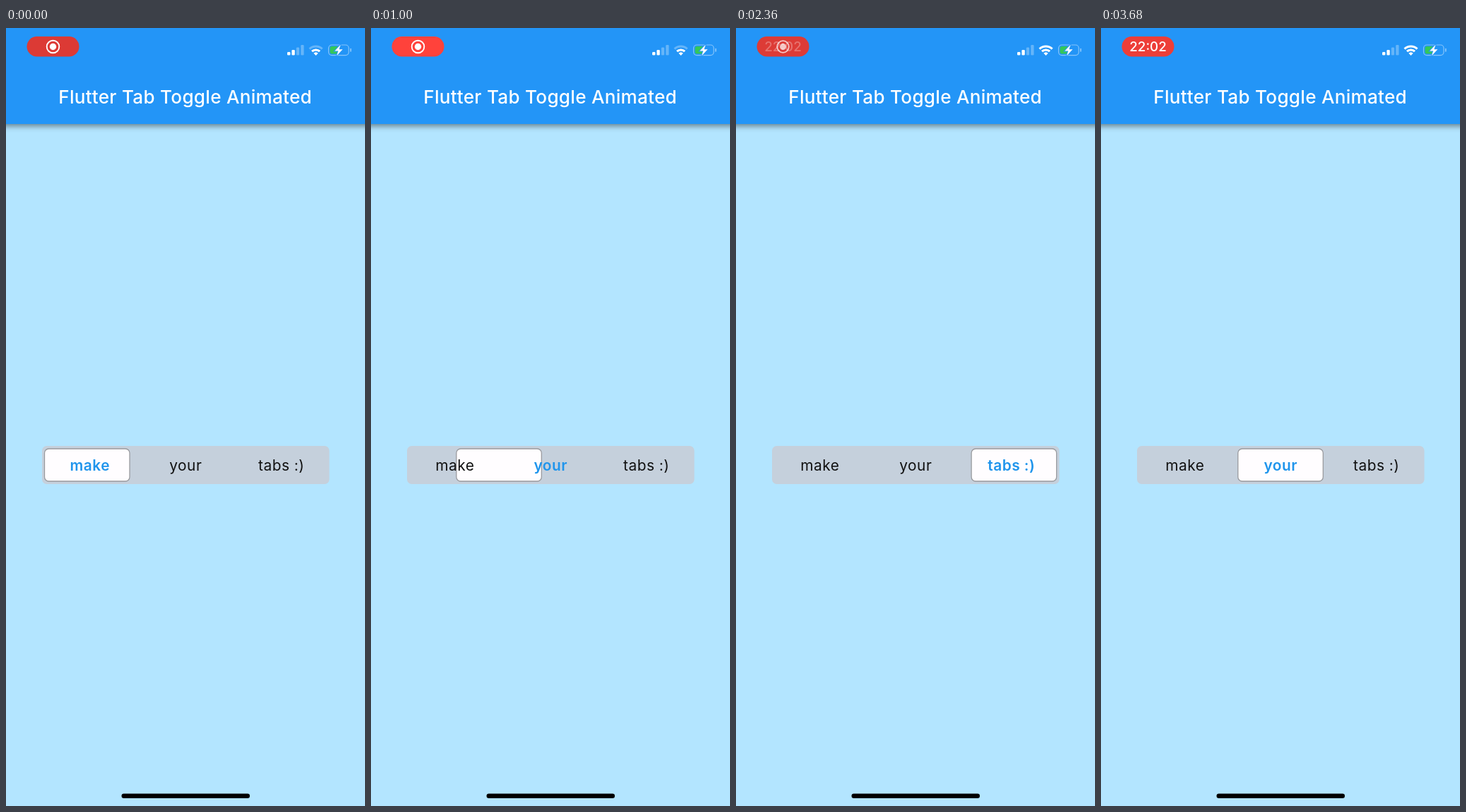
An HTML page with a canvas for the animation above (3.72 s loop, 508x1102 px).

```html
<!DOCTYPE html>
<html lang="en">
<head>
<meta charset="utf-8">
<title>Tab toggle</title>
<style>
  html, body { margin: 0; width: 100%; height: 100%; overflow: hidden; background: #b3e5ff; }
  canvas { display: block; width: 508px; height: 1102px; }
</style>
</head>
<body>
<canvas id="stage"></canvas>
<script>
const W = 508, H = 1102, LOOP = 3720;
const canvas = document.getElementById('stage');
const ctx = canvas.getContext('2d');
const dpr = window.devicePixelRatio || 1;
canvas.width = W * dpr;
canvas.height = H * dpr;

const BLUE = '#2395f7', FAINT = 'rgba(255,255,255,.3)';
const TABS = ['make', 'your', 'tabs :)'];
const MOVES = [
  { at: 880, from: 0, to: 1 },
  { at: 1560, from: 1, to: 2 },
  { at: 2600, from: 2, to: 1 }
];
const MOVE_MS = 250;

const clamp = v => Math.min(1, Math.max(0, v));
const ramp = (t, start, length) => clamp((t - start) / length);
const ease = p => p * p * (3 - 2 * p);

function box(x, y, w, h, r, fill) {
  ctx.beginPath();
  ctx.roundRect(x, y, w, h, r);
  if (fill) {
    ctx.fillStyle = fill;
    ctx.fill();
  }
}

function text(str, x, y, size, weight, color, spacing = 0) {
  ctx.font = `${weight} ${size}px Inter, "Open Sans", sans-serif`;
  ctx.letterSpacing = spacing + 'px';
  ctx.textAlign = 'center';
  ctx.fillStyle = color;
  ctx.fillText(str, x + spacing / 2, y);
}

function appBar() {
  ctx.save();
  ctx.shadowColor = 'rgba(0,0,0,.45)';
  ctx.shadowBlur = 8 * dpr;
  ctx.shadowOffsetY = 3 * dpr;
  ctx.fillStyle = BLUE;
  ctx.fillRect(-20, -20, W + 40, 156);
  ctx.restore();
  text('Flutter Tab Toggle Animated', 253.5, 107, 26.05, 500, '#fff', 0.3);
}

function recordPill(t) {
  const pulse = Math.cos((t - 1160) / 1000 * Math.PI);
  const rgb = [238 + 21 * pulse, 62 + 4 * pulse, 56 + 3 * pulse].map(Math.round);
  box(29.5, 12, 74, 28.5, 14.25, `rgb(${rgb})`);

  const swap = ramp(t, 2270, 320);
  ctx.save();
  ctx.globalAlpha = swap;
  text('22:02', 66.5, 33, 18.8, 500, '#fff');
  ctx.globalAlpha = 1 - swap;
  ctx.translate(66.5, 26.5);
  ctx.scale(1 - swap * 0.2, 1 - swap * 0.2);
  ctx.strokeStyle = ctx.fillStyle = '#fff';
  ctx.lineWidth = 1.9;
  ctx.beginPath();
  ctx.arc(0, 0, 8.8, 0, 7);
  ctx.stroke();
  ctx.beginPath();
  ctx.arc(0, 0, 4.7, 0, 7);
  ctx.fill();
  ctx.restore();
}

function signal() {
  [4.5, 7.5, 11, 14.5].forEach((h, i) =>
    box(398 + i * 6.4, 38.5 - h, 4.3, h, 1.2, i < 2 ? '#fff' : FAINT));
}

function wifi(t) {
  const cx = 438.5, cy = 39, spread = 0.76;
  const band = (inner, outer, color) => {
    ctx.beginPath();
    ctx.arc(cx, cy, outer, -Math.PI / 2 - spread, -Math.PI / 2 + spread);
    ctx.arc(cx, cy, inner, -Math.PI / 2 + spread, -Math.PI / 2 - spread, true);
    ctx.fillStyle = color;
    ctx.fill();
  };
  band(0, 4.6, '#fff');
  band(6.4, 9.6, '#fff');
  band(11.5, 14.6, t < 2320 ? FAINT : '#fff');
}

function battery() {
  box(456.5, 24, 28.5, 14.6, 4.5);
  ctx.strokeStyle = 'rgba(255,255,255,.45)';
  ctx.lineWidth = 1.2;
  ctx.stroke();
  box(487, 28.8, 1.6, 5, 0.8, 'rgba(255,255,255,.5)');
  box(458.5, 26, 12, 10.6, [2.8, 0.5, 0.5, 2.8], '#34c759');

  ctx.beginPath();
  [[473.6, 23.4], [465.2, 32.4], [470.2, 32.4], [467.8, 39.4], [476.4, 30.2], [471.3, 30.2]]
    .forEach(p => ctx.lineTo(...p));
  ctx.closePath();
  ctx.strokeStyle = BLUE;
  ctx.lineWidth = 2;
  ctx.stroke();
  ctx.fillStyle = '#fff';
  ctx.fill();
}

function toggle(t) {
  let active = 0, pos = 0;
  for (const m of MOVES) {
    if (t < m.at) break;
    active = m.to;
    pos = m.from + (m.to - m.from) * ease(ramp(t, m.at, MOVE_MS));
  }
  box(51, 592, 406.5, 54, 6.5, '#c5d0dc');
  box(54.5 + pos * 139.3, 596, 120.5, 46, 6, '#fffdff');
  ctx.strokeStyle = '#999a9e';
  ctx.lineWidth = 1.3;
  ctx.stroke();
  TABS.forEach((label, i) => {
    const on = i === active;
    text(label, 118.5 + i * 135.5, 626.7, 20.84, on ? 600 : 400, on ? '#2095ec' : '#111', 0.5);
  });
}

function draw(t) {
  ctx.setTransform(dpr, 0, 0, dpr, 0, 0);
  ctx.fillStyle = '#b3e5ff';
  ctx.fillRect(0, 0, W, H);
  appBar();
  recordPill(t);
  signal();
  wifi(t);
  battery();
  toggle(t);
  box(163.5, 1084.5, 181.5, 6.5, 3.25, '#000');
}

const start = performance.now();
function tick() {
  draw((performance.now() - start) % LOOP);
  requestAnimationFrame(tick);
}
tick();
</script>
</body>
</html>
```
